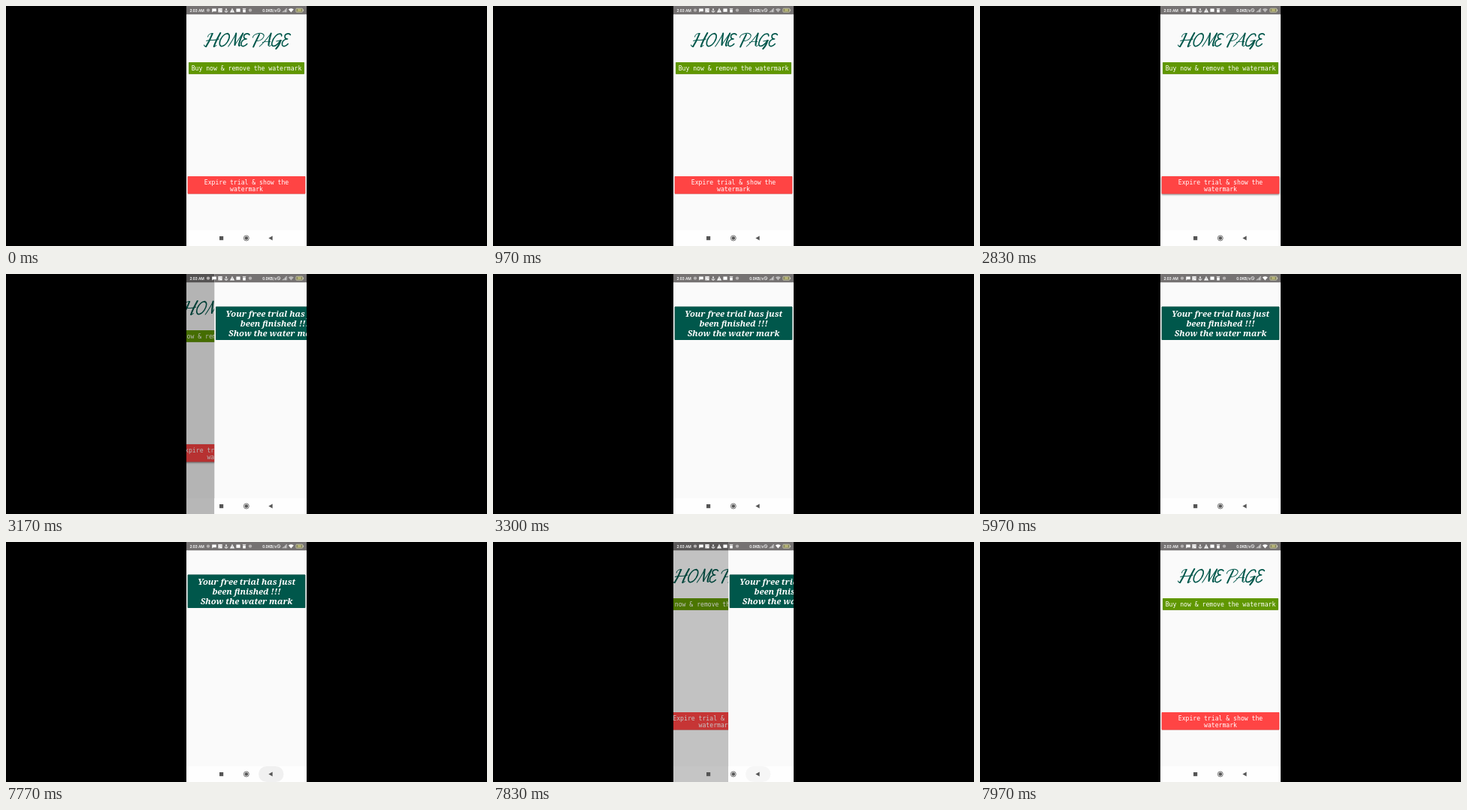
An HTML page that plays this animation: 640 px wide and 320 px high, repeating every 8 s.

```html
<!DOCTYPE html>
<html lang="en">
<head>
<meta charset="utf-8">
<title>Trial demo</title>
<style>
  html, body { margin: 0; height: 100%; overflow: hidden; background: #000; }
  svg { display: block; }
  text { text-anchor: middle; fill: #fff; }
  .mono { font: 8.15px "DejaVu Sans Mono", "Noto Sans Mono", monospace; }
  .serif { font: italic 700 11.2px "Noto Serif", "Liberation Serif", serif; }
  .small text { font: 500 5.2px Roboto, Arial, sans-serif; text-anchor: start; }
  .raised { filter: drop-shadow(0 .7px .7px rgba(0, 0, 0, .4)); }
  .title { fill: none; stroke: #00574b; stroke-linecap: round; stroke-linejoin: round; }
</style>
</head>
<body>
<svg width="100%" height="100%" viewBox="0 0 640 320">
  <rect width="640" height="320"/>
  <svg x="240" width="160" height="320" viewBox="240 0 160 320">
    <defs>
      <g id="blank">
        <rect x="240" width="160" height="320" fill="#fafafa"/>
        <rect x="240" width="160" height="11.2" fill="#757272"/>
        <rect x="240" y="299" width="160" height="21" fill="#fefefe"/>
      </g>
      <path id="e" d="M323 38.5C321 35.5 315 37 316 41C316.5 44 319 44 320 44C315 44 312.5 48 314 52C315.5 55 319.5 53.5 321.5 50.5"/>
    </defs>

    <g id="home">
      <use href="#blank"/>
      <g class="title" role="img" aria-label="HOME PAGE" transform="translate(6.3) skewX(-8)">
        <g stroke-width="2.1">
          <path d="M273.5 37C272 43 270 49 267.5 54M284 36C281.5 42 279 48 278 54"/>
          <path d="M305 36.5C305 43 305 47 305.5 52M314 36.5C312 43 310.5 48 311 52.5"/>
          <path d="M336 38C334 44 332 49 330.5 54.5M351.5 36.5C350.5 43 350 48 350.5 52M365.5 46C365 50 363.5 54 361 57"/>
        </g>
        <g stroke-width="1.6">
          <path d="M294 36.5C288 37 284 45 285 50C286 56 292 54 295 48C298 42 297 36 292 37"/>
          <path d="M366 40C366 36 361 36 358 40C354 45 353 53 357 53.5C361 53.5 364 49 365 46"/>
          <use href="#e"/>
          <use href="#e" x="54.5"/>
        </g>
        <g stroke-width="1">
          <path d="M264.5 52q1 2.5 3 2M268 41c0-3 3-4.5 6-4.5M267 46.5C271 44 278 47 283 44M278 54q1.5 .5 3-1.5"/>
          <path d="M297 54C300 49 303 42 305 36.5M305.5 52C308 47 311 41 314 36.5M311 52.5q.7 2 2.5-.5"/>
          <path d="M328 42C328 37 337 35 341 37.5C344.5 40 341 46.5 334 46.5"/>
          <path d="M338.5 54C343 50 348 42 351.5 36.5M350.5 52q.5 3 3 .5M342 48.5q4-1.5 10-1M360 47q4-1 7-1"/>
        </g>
      </g>
      <rect class="raised" x="243" y="75" width="154" height="15.7" rx=".8" fill="#609700"/>
      <text class="mono" x="320" y="86">Buy now &amp; remove the watermark</text>
      <rect id="expire" class="raised" x="241.7" y="227" width="156.6" height="23.5" rx=".8" fill="#ff4444"/>
      <text class="mono" x="320" y="237.6">Expire trial &amp; show the</text>
      <text class="mono" x="320" y="247.1">watermark</text>
    </g>
    <rect id="dim" x="240" width="160" height="320"/>

    <g id="notice">
      <use href="#blank"/>
      <rect class="raised" x="241.7" y="43.6" width="156.6" height="44.4" rx=".8" fill="#00574b"/>
      <text class="serif" x="320" y="57">Your free trial has just</text>
      <text class="serif" x="320" y="70">been finished !!!</text>
      <text class="serif" x="320" y="83">Show the water mark</text>
    </g>

    <g class="small" fill="#fff">
      <text x="244.4" y="7.7">2:03 AM</text>
      <text x="341.2" y="7.7">0.0KB/s</text>
      <g fill="#b5b2b2">
        <circle cx="269" cy="5.6" r="2.2"/>
        <circle cx="325" cy="5.6" r="2.2"/>
      </g>
      <path d="M274.2 3.4h5.6v3.8h-4l-1.6 1.4z"/>
      <path d="M282.4 3h5.2v5.4h-5.2z"/>
      <path d="M283.4 4.2h1.2m1 0h1m-3 2.8h1m1-1.2h1" stroke="#757272" stroke-width=".8"/>
      <path d="M293 3v5.2m-2-2q0 2 2 2t2-2m-3-1.6h2" fill="none" stroke="#fff" stroke-width=".8"/>
      <path d="M301 2.8l3 5.6h-6z"/>
      <path d="M301 4.8v1.7m0 .6v.6" stroke="#757272" stroke-width=".7"/>
      <rect x="306.4" y="3.5" width="5.2" height="4.3"/>
      <path d="M314.8 3.2h4.4v.8h-4.4zM315.2 4.5h3.6v4h-3.6z"/>
      <circle cx="362.8" cy="5.6" r="2" fill="none" stroke="#fff" stroke-width=".7"/>
      <path d="M361.4 4.2l2.8 2.8" stroke="#fff" stroke-width=".6"/>
      <path d="M367.8 8.2v-1h1v1zM369.4 8.2v-2.2h1v2.2zM371 8.2v-3.6h1v3.6zM372.6 8.2v-5.2h1v5.2z" opacity=".8"/>
      <path id="wifi" d="M375.8 4.6q3.5-2.8 7 0l-3.5 4z"/>
      <rect x="385.8" y="3.2" width="9" height="5" rx="1" fill="#8b8a62" stroke="#e4e3c8" stroke-width=".6"/>
      <rect x="395.3" y="4.6" width=".8" height="2.2" fill="#e4e3c8"/>
      <text x="388.1" y="7.2" style="font-size:4px;fill:#f1ee8c">28</text>
    </g>

    <rect id="ripple" x="336" y="299" width="33.5" height="21" rx="10.5"/>
    <g fill="#555">
      <rect x="284" y="307" width="5.2" height="5.2"/>
      <circle cx="319.8" cy="309.5" r="3.5" fill="none" stroke="#555" stroke-width=".8"/>
      <circle cx="319.8" cy="309.5" r="2.3"/>
      <path d="M349.4 309.5l5.2-3v6z"/>
    </g>
  </svg>
</svg>
<script>
  const LOOP = 8000, STEP = 200 / 3;
  const el = id => document.getElementById(id);
  const [home, dim, notice, expire, wifi, ripple] =
    ["home", "dim", "notice", "expire", "wifi", "ripple"].map(el);

  const easeOut = (t, from, to) => {
    const u = Math.min(1, Math.max(0, (t - from) / (to - from)));
    return 1 - (1 - u) ** 2;
  };

  function draw(time) {
    const t = Math.floor((time + 38) / STEP) * STEP - STEP / 2;
    const open = easeOut(t, 3025, 3299) - easeOut(t, 7786, 7966);
    const behind = open ** 0.65; // the page below follows unevenly

    home.setAttribute("transform", `translate(${-36.3 * behind})`);
    notice.setAttribute("transform", `translate(${160 * (1 - open)})`);
    dim.setAttribute("opacity", 0.335 * behind);

    const pressed = t > 2800 && t < 3300;
    expire.style.filter = pressed ? "drop-shadow(0 1.3px 1.2px rgba(0,0,0,.5))" : "";
    wifi.setAttribute("opacity", t > 960 && t < 3960 ? 0.5 : 1);
    const glow = t < 7760 ? 0 : 1 - Math.min(1, Math.max(0, (t - 7766) / 150));
    ripple.setAttribute("opacity", 0.055 * glow);
  }

  const start = performance.now();
  function tick() {
    draw((performance.now() - start) % LOOP);
    requestAnimationFrame(tick);
  }
  tick();
</script>
</body>
</html>
```
